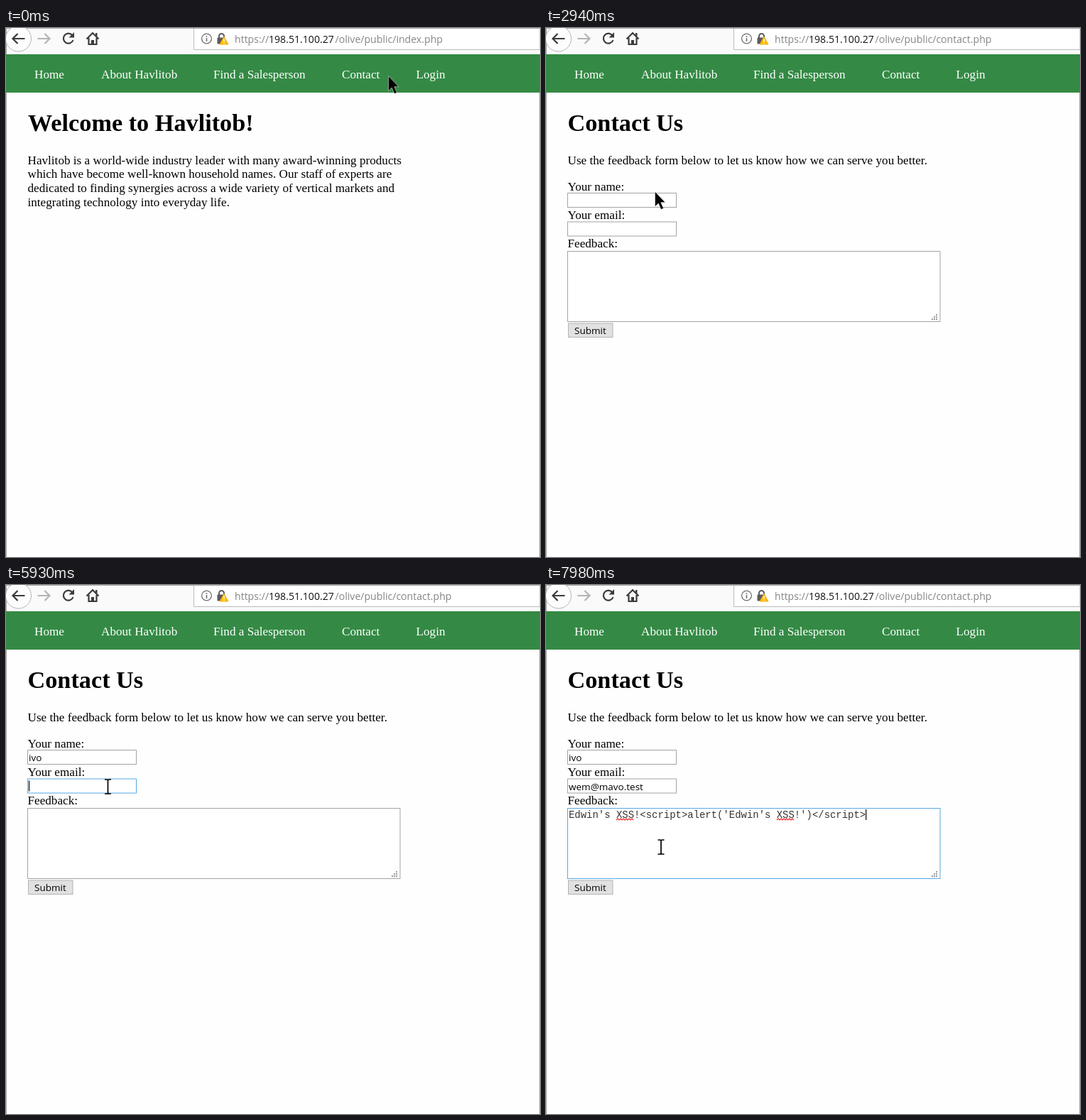
An HTML page that plays this animation: 752x745 px, repeating every 8 s.

```html
<!DOCTYPE html>
<html lang="en">
<head>
<meta charset="utf-8">
<title>Contact form</title>
<style>
html, body { margin: 0; width: 100%; height: 100%; overflow: hidden; background: #fefefe; }
svg { display: block; }
text { font: 17.16px "Liberation Serif", serif; white-space: pre; }
.title { font-size: 34.25px; font-weight: bold; }
.sans { font: 13.5px "Open Sans", "Noto Sans", sans-serif; }
.url { font: 14.1px "Open Sans", "Noto Sans", sans-serif; fill: #858585; }
.mono { font: 13.95px "Liberation Mono", monospace; fill: #333; }
.nav text { fill: #fff; }
.field { fill: #fff; stroke: #a3a3a3; }
.icon { fill: none; stroke: #3b3b3d; stroke-width: 2.2; }
</style>
</head>
<body>
<svg width="752" height="745" viewBox="0 0 752 745">
  <rect width="752" height="745" fill="#fefefe"/>
  <rect width="752" height="37" fill="#fafafb"/>
  <path d="M264.5 0V30.5H752V0Z" fill="#fff" stroke="#bcbcbe"/>
  <path d="M0 .5H752M.5 0V745M751.5 38V745" stroke="#aaa"/>

  <circle cx="17.5" cy="15" r="18" fill="#fdfdfd" stroke="#b5b5b7"/>
  <path class="icon" d="M26.5 15H10M16.5 8L9.5 15L16.5 22"/>
  <path class="icon" d="M44.5 15H61M54.5 8L61.5 15L54.5 22" style="stroke:#b4b4b6"/>
  <g id="reload">
    <path class="icon" d="M93.5 10.5A7 7 0 1 0 94.5 17"/>
    <path d="M96 6V13.5H88.5Z" fill="#3b3b3d"/>
  </g>
  <path id="stop" class="icon" d="M80.5 8L94.5 22M94.5 8L80.5 22"/>
  <path class="icon" d="M113.5 15.5L122 7L130.5 15.5M116.5 14V23H127.5V14"/>
  <path d="M120 17h4v6h-4ZM126 7h2.5v5l-2.5-2Z" fill="#3b3b3d"/>

  <circle cx="282.5" cy="15" r="6.9" fill="none" stroke="#6e6e70" stroke-width="1.3"/>
  <path d="M282.5 11v1.8M282.5 14v5" stroke="#6e6e70" stroke-width="1.6"/>
  <path d="M300 14V11.5a3.5 3.5 0 0 1 7 0V14" fill="none" stroke="#5b5b5d" stroke-width="2"/>
  <rect x="297.5" y="13.5" width="11" height="9" rx="1" fill="#5b5b5d"/>
  <path d="M307 12.5L313 23H301Z" fill="#ffbf00" stroke="#f3ae10" stroke-linejoin="round"/>
  <path d="M307 15.5v4M307 20.7v1.4" stroke="#fff" stroke-width="1.4"/>

  <text class="url" x="322" y="21">https://</text>
  <text class="url" x="370" y="21" style="fill:#111">198.51.100.27</text>
  <text class="url" x="463.5" y="21" id="path"></text>

  <g class="nav">
    <rect y="37" width="752" height="54" fill="#348a45"/>
    <text x="40" y="71">Home</text>
    <text x="134" y="71">About Havlitob</text>
    <text x="292" y="71">Find a Salesperson</text>
    <text x="473" y="71">Contact</text>
    <text x="577.5" y="71">Login</text>
    <rect id="outline" x="472.5" y="55.5" width="55" height="20" fill="none" stroke="#fff" stroke-dasharray="1 1"/>
  </g>

  <g id="home">
    <text class="title" x="31" y="145">Welcome to Havlitob!</text>
    <text x="30.5" y="192">Havlitob is a world-wide industry leader with many award-winning products</text>
    <text x="30.5" y="211">which have become well-known household names. Our staff of experts are</text>
    <text x="30.5" y="231">dedicated to finding synergies across a wide variety of vertical markets and</text>
    <text x="30.5" y="251">integrating technology into everyday life.</text>
  </g>

  <g id="contact">
    <text class="title" x="30.5" y="145">Contact Us</text>
    <text x="30.5" y="192">Use the feedback form below to let us know how we can serve you better.</text>
    <text x="30.5" y="229">Your name:</text>
    <text x="30.5" y="269">Your email:</text>
    <text x="30.5" y="309">Feedback:</text>
    <rect class="field" x="30.5" y="232.5" width="153" height="20"/>
    <rect class="field" x="30.5" y="273" width="153" height="20"/>
    <rect class="field" x="30.5" y="314.5" width="524.5" height="99"/>
    <text class="sans entry" x="32" y="248"></text>
    <text class="sans entry" x="32" y="289"></text>
    <text class="mono entry" x="32" y="327.5"></text>
    <path id="wavy" fill="none" stroke="#e22" stroke-width="1.1"/>
    <path d="M549 404h2M546 407h2m1 0h2M543 410h2m1 0h2m1 0h2" stroke="#999" stroke-width="2"/>
    <rect x="31.5" y="416" width="62.5" height="19.5" fill="#e1e1e1" stroke="#b4b4b4"/>
    <text class="sans" x="40" y="431">Submit</text>
    <path id="caret" d="M0 0V15" stroke="#000" stroke-width="1.2"/>
  </g>

  <path id="arrow" d="M.5 .5V21.5L5.3 17L9 25.5L12.5 24L8.8 15.7H15Z" stroke="#fff" stroke-opacity=".7" stroke-width=".7"/>
  <path id="hand" d="M5 16V2.5q2-2.5 4 0V9q6 0 10 3.5q1 4-1 9V25.5H8q-3-5-7-9q0-3 4-.5Z" fill="#fff" stroke="#000" stroke-width="1.3"/>
  <path id="beam" d="M-4.5-10H-1.5Q0-10 0-8.5Q0-10 1.5-10H4.5M0-8.5V8.5M-4.5 10H-1.5Q0 10 0 8.5Q0 10 1.5 10H4.5" fill="none" stroke="#000" stroke-width="1.7"/>
</svg>
<script>
const LOOP = 8000;
const $ = id => document.getElementById(id);
const fields = document.querySelectorAll('.field');
const entries = document.querySelectorAll('.entry');
const caretTop = [235, 275.5, 316];

// Each track lists [start time, values...]; a value holds until the next one.
const pointer = [
  [0, 'arrow', 538, 67], [130, 'arrow', 530, 67], [300, 'hand', 516, 67], [460, 'hand', 513, 68],
  [1030, 'hand', 506, 71], [1160, 'arrow', 468, 86], [1290, 'arrow', 413, 104], [1430, 'arrow', 354, 122],
  [1550, 'arrow', 322, 138], [1690, 'arrow', 297, 151], [1820, 'arrow', 276, 160],
  [1970, 'arrow', 258, 167], [2110, 'arrow', 245, 171], [2240, 'arrow', 236, 174],
  [2390, 'arrow', 216, 188], [2530, 'arrow', 191, 205], [2670, 'arrow', 171, 219],
  [2800, 'arrow', 158, 227], [2940, 'arrow', 153, 230], [3220, 'arrow', 152, 230],
  [3500, 'beam', 152.5, 237], [4820, 'beam', 159, 243], [4970, 'arrow', 166, 253],
  [5120, 'arrow', 169, 255], [5240, 'arrow', 162, 262], [5380, 'beam', 151, 281],
  [5520, 'beam', 143.5, 284], [6870, 'arrow', 132, 295], [7020, 'beam', 148, 338], [7140, 'beam', 162, 369]
];
const email = 'wem@mavo.test';
const note = "Edwin's XSS!<script>alert('Edwin's XSS!')<\/script>";
const typing = [
  [[0, ''], [4420, 'i'], [4560, 'iv'], [4690, 'ivo']],
  [[0, ''], [6240, email.slice(0, 3)], [6370, email.slice(0, 5)], [6490, email.slice(0, 8)],
    [6620, email.slice(0, 11)], [6740, email]],
  [[0, ''], [7820, note]]
];
const focus = [[0, -1], [3620, 0], [5790, 1], [7140, 2]];
const caretOn = [[0, false], [3620, true], [4170, false], [4420, true], [5240, false],
  [5790, true], [7140, false], [7290, true]];

const at = (track, t) => track.findLast(step => step[0] <= t).slice(1);
const show = (id, on) => $(id).style.display = on ? '' : 'none';
const move = (id, x, y) => $(id).setAttribute('transform', `translate(${x} ${y})`);

$('wavy').setAttribute('d', [99, 325].map(x => `M${x} 331` + 'l2-2l2 2'.repeat(6)).join(''));

function draw(t) {
  const loaded = t >= 1970;
  const loading = t >= 1030 && t < 2670;
  show('home', !loaded);
  show('contact', loaded);
  show('outline', t >= 890 && !loaded);
  show('stop', loading);
  show('reload', !loading);
  $('stop').style.stroke = loaded ? '#b4b4b6' : '';
  $('path').textContent = `/olive/public/${loaded ? 'contact' : 'index'}.php`;

  const [active] = at(focus, t);
  fields.forEach((field, i) => {
    field.style.stroke = i === active ? (t >= 7140 && t < 7290 ? '#7da6c2' : '#57a9e2') : '';
  });
  entries.forEach((entry, i) => entry.textContent = at(typing[i], t)[0]);
  show('wavy', t >= 7980);

  const caret = at(caretOn, t)[0];
  show('caret', caret);
  if (caret) move('caret', 32.5 + entries[active].getComputedTextLength(), caretTop[active]);

  const [kind, x, y] = at(pointer, t);
  for (const id of ['arrow', 'hand', 'beam']) show(id, id === kind);
  move(kind, x, y);
}

const start = performance.now();
function tick() {
  draw((performance.now() - start) % LOOP);
  requestAnimationFrame(tick);
}
tick();
</script>
</body>
</html>
```
